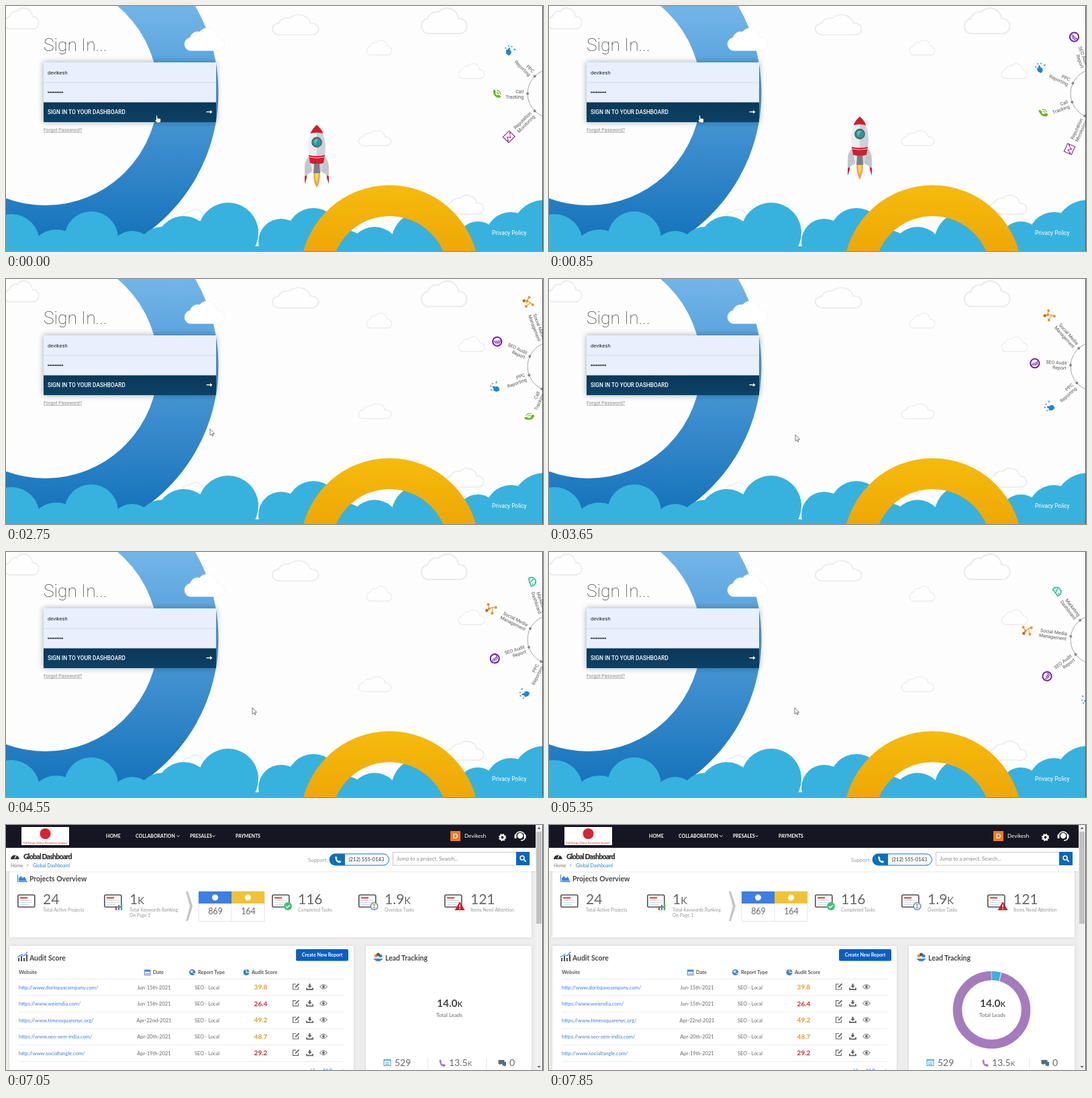
An HTML page for the animation above (8000 ms loop, 800x365 px).

```html
<!DOCTYPE html>
<html lang="en">
<head>
<meta charset="utf-8">
<title>Sign in</title>
<style>
html, body { margin: 0; width: 100%; height: 100%; overflow: hidden; background: #fdfdfe; }
svg { display: block; width: 100vw; height: 100vh; }
#login { font-family: Roboto, sans-serif; }
#board { font-family: Lato, sans-serif; }
</style>
</head>
<body>
<svg id="stage" viewBox="0 0 800 365" preserveAspectRatio="none">
  <defs>
    <linearGradient id="blue" gradientUnits="userSpaceOnUse" x1="0" y1="0" x2="0" y2="345">
      <stop stop-color="#72b5e9"/><stop offset="1" stop-color="#1673bb"/>
    </linearGradient>
    <linearGradient id="gold" gradientUnits="userSpaceOnUse" x1="0" y1="267" x2="0" y2="365">
      <stop stop-color="#f5bb0d"/><stop offset="1" stop-color="#efa704"/>
    </linearGradient>
    <linearGradient id="navy" x1="0" x2="0" y1="0" y2="1">
      <stop stop-color="#0b3857"/><stop offset="1" stop-color="#0c4166"/>
    </linearGradient>
    <filter id="soft" x="-10%" y="-25%" width="120%" height="150%">
      <feDropShadow dx="0" dy="0" stdDeviation="4.5" flood-color="#123" flood-opacity=".4"/>
    </filter>
    <filter id="lift" x="-5%" y="-10%" width="110%" height="120%">
      <feDropShadow dx="0" dy="0" stdDeviation="1.5" flood-opacity=".16"/>
    </filter>
    <path id="cloud" d="M10 33a9 9 0 0 1-2-18 12 12 0 0 1 14-8 15 15 0 0 1 26 8 9 9 0 0 1 3 18Z"/>
    <path id="phone" d="M-5-4q2-3 3 0l1 2-1 1.5q1 2 3 3l1.5-1 2 1.2q2 1.5-1 3.3Q-4 6-5-4Z"/>
    <g id="monitor">
      <rect x=".8" y=".8" width="25" height="18" rx="1.5" fill="#fff" stroke="#505050" stroke-width="1.6"/>
      <path d="M4 5h11" stroke="#d9473f" stroke-width="2.2"/>
      <path d="M4 9h18M4 12h18M4 15h13" stroke="#d5d5d5"/>
    </g>
  </defs>
  <g id="login"></g>
  <g id="board"></g>
  <path d="M799.5 0V365" stroke="#555"/>
</svg>
<script>
const $ = id => document.getElementById(id);
const text = (x, y, str, size, fill, attrs = '') =>
  `<text x="${x}" y="${y}" font-size="${size}" fill="${fill}" ${attrs}>${str}</text>`;
const rect = (x, y, w, h, fill, attrs = '') =>
  `<rect x="${x}" y="${y}" width="${w}" height="${h}" fill="${fill}" ${attrs}/>`;
const dot = (x, y, r, fill, attrs = '') =>
  `<circle cx="${x}" cy="${y}" r="${r}" fill="${fill}" ${attrs}/>`;
const path = (d, fill, attrs = '') => `<path d="${d}" fill="${fill}" ${attrs}/>`;
const line = (d, color, width = 1) => path(d, 'none', `stroke="${color}" stroke-width="${width}"`);
const use = (id, x, y, scale = 1, attrs = '') =>
  `<use href="#${id}" transform="translate(${x} ${y}) scale(${scale})" ${attrs}/>`;
const group = (id, body, attrs = '') => `<g id="${id}" ${attrs}>${body}</g>`;
const MID = 'text-anchor="middle"', BOLD = 'font-weight="700"';

/* ---------- sign-in page ---------- */
const HUB = { x: 813.6, y: 130.5, r: 36.6 };

// label lines, angle from the leading item, icon radius, icon
const wheelItems = [
  [['SEO Audit', 'Report'], 0, 90,
    dot(0, 0, 6.6, '#fff', 'stroke="#6d1bb0" stroke-width="2"') + line('M-3.5 3V.5M-1.2 3.6V-1M1.2 3.4V-2M3.5 2V-3.5', '#6d1bb0', 1.3)],
  [['PPC', 'Reporting'], -45, 91,
    path('M-3-3q2-2 3 1l4 1q3 2 1 7h-5l-4-4 2-1Z', '#1f86d2') + line('M-6-5l2 1M-1-8v2M4-6l2-2M-7 1h2', '#35a4e4', 1.8)],
  [['Call', 'Tracking'], -90, 82.5,
    use('phone', 0, 0, 1.1, 'fill="#6db21f"') + line('M0-2a3 3 0 0 1 2.500 3M0-5a6 6 0 0 1 5.500 6', '#7ebf2f', 1.3)],
  [['Reputation', 'Monitoring'], -135, 91,
    rect(-6.5, -6, 13, 12, '#fff', 'stroke="#8e2f8e" stroke-width="1.2"') + line('M-5 3l3-4 3 3 4-5', '#c0448f', 1.1) +
    [[-5, 3], [-2, -1], [1, 2], [5, -3]].map(p => dot(...p, 1.1, '#8e2f8e')).join('')],
  [['Social Media', 'Management'], 45, 102.5,
    line('M-6-4L-2 1 2-3 6-5M-2 1L-4 6M2-3L5 5', '#e99a2c', 1.1) +
    [[-6, -4], [-2, 1], [6, -5], [5, 5]].map(p => dot(...p, 2, '#e8941f')).join('') + rect(-6, 3, 4, 4, '#c8631b')],
  [['Marketing', 'Dashboard'], 89.5, 91.5,
    path('M-6 4a6.5 6.5 0 1 1 12 0Z', '#eafaf5', 'stroke="#35bd9b" stroke-width="1.7"') + line('M0 3L-3-3M3 1h2', '#35bd9b', 1.4)],
  [['Software'], 134.5, 88,
    rect(-6.5, -7.5, 13, 15, '#d93a2f', 'rx="1"') + rect(-4, -5, 8, 4, '#fff') + line('M-3 3h6M0 0v5', '#fff', 1.4)],
];

const wheelItem = ([lines, angle, r, icon]) => `<g transform="rotate(${angle})">
  ${dot(-HUB.r, 0, 2, '#888')}
  ${lines.map((s, i) => text(-42.5, -.5 + i * 7.5, s, 7, '#555', 'text-anchor="end"')).join('')}
  <g transform="translate(${-r} 0)">${icon}</g></g>`;

// x, y, width, height
const outlineClouds = [[-1, 3, 50, 31], [398, 13, 68, 30], [620, 3, 67, 38], [538, 51, 37, 22], [675, 86, 38, 22],
  [526, 186, 48, 22], [656, 282, 56, 28], [257, 303, 46, 26]];
const cloud = ([x, y, w, h], attrs) =>
  `<use href="#cloud" transform="translate(${x} ${y}) scale(${w / 58} ${h / 31}) translate(-1 -2)" ${attrs}/>`;

// x, y, radius
const bumps = [[8, 352, 42], [75, 375, 42], [127, 346, 40], [188, 368, 33], [232, 365, 36], [265, 355, 42],
  [331, 338, 45], [410, 351, 34], [458, 341, 40], [505, 372, 38], [549, 367, 38], [620, 352, 46],
  [655, 366, 36], [703, 352, 31], [752, 345, 38], [802, 338, 49]];

const rocket =
  path('M-8 44Q-18 50-18 64V88l4-14 7-4ZM8 44Q18 50 18 64V88l-4-14-7-4Z', '#c3c6cb') +
  path('M-18 77V88l3-9v-4ZM18 77V88l-3-9v-4Z', '#c8202d') +
  path('M-4.500 71Q-6 83 0 94 6 83 4.500 71Z', '#f0a04a') + path('M-2.500 71Q-3 80 0 87 3 80 2.500 71Z', '#fcd94a') +
  path('M0 0Q16 17 12 46L6 71H-6L-12 46Q-16 17 0 0Z', '#ececef') +
  path('M0 0Q16 17 12 46L6 71H0Z', '#cfd1d6') +
  path('M0 0Q7 6 9.500 13Q0 10-9.500 13-7 6 0 0Z', '#cf1f2e') +
  path('M-12 45Q0 48 12 45L10 57Q0 60-10 57Z', '#cf1f2e') +
  line('M-11.500 48Q0 51 11.500 48', '#e8e8ea', .9) + path('M-4 58H4L5 72H-5Z', '#777e8a') +
  dot(0, 26, 7, '#2a9b9b', 'stroke="#58606c" stroke-width="1.8"') + path('M-4 24a5 5 0 0 1 6-2l-5 7Z', '#63c6c0');

$('login').innerHTML =
  rect(0, 0, 800, 365, '#fdfdfe') +
  outlineClouds.map(c => cloud(c, 'fill="#fefefe" stroke="#ebebee" stroke-width="1.8"')).join('') +
  dot(58.5, 129, 213, 'none', 'stroke="url(#blue)" stroke-width="90"') +
  cloud([267, 33, 59, 33.5], 'fill="#fff" stroke="#eceff3" stroke-width=".6"') +
  bumps.map(b => dot(...b, '#37b2de')).join('') + rect(0, 358, 800, 7, '#37b2de') +
  dot(571.5, 400, 110, 'none', 'stroke="url(#gold)" stroke-width="46"') +
  group('rocket', rocket) +
  text(56, 67, 'Sign In...', 26.4, '#333', 'font-weight="100"') +
  rect(56, 84, 257, 89, '#e8f0fe', 'filter="url(#soft)"') +
  line('M56 114H313', '#c9d1dd', .8) + rect(56, 143.5, 257, 29.5, 'url(#navy)') +
  text(62, 101.5, 'devikesh', 7.6, '#222') +
  Array.from({ length: 9 }, (_, i) => dot(63.2 + i * 2.6, 128.6, 1.05, '#111')).join('') +
  text(62, 160.6, 'SIGN IN TO YOUR DASHBOARD', 8.3, '#fff', 'font-weight="500"') +
  line('M298.5 157.7H306', '#fff', 1.4) + path('M304 155l3.5 2.7-3.5 2.7Z', '#fff') +
  text(56, 186.8, 'Forgot Password?', 7.1, '#8a8a8a', 'text-decoration="underline"') +
  text(724, 341.3, 'Privacy Policy', 8.4, '#fff') +
  dot(HUB.x, HUB.y, HUB.r, '#fff', 'stroke="#999" stroke-width=".9"') +
  group('wheel', wheelItems.map(wheelItem).join('')) +
  group('hand', path('M2 0q1.2-.6 1.6.5V4l4 .9q1.3.4 1 2L8 11H3L-.4 7q.3-1.5 2 0V1Z', '#fff', 'stroke="#333" stroke-width=".7"')) +
  group('arrow', path('M0 0V9.5L2.3 7.5 3.8 10.6 5 10 3.6 7H6.6Z', '#fff', 'stroke="#444" stroke-width=".7"'));

/* ---------- dashboard page ---------- */
const GREY = '#666', PALE = '#999', LINK = '#3c7edb';
const kilo = n => `${n}<tspan font-size="70%">K</tspan>`;
const panel = (x, y, w, h) => rect(x, y, w, h, '#fff', 'filter="url(#lift)"');
const heading = (x, y, str) => text(x, y, str, 10.4, '#444', BOLD);
const metric = (x, icon, value, ...labels) => use('monitor', icon, 103.5) +
  text(x, 117.5, value, 21, GREY) + labels.map((s, i) => text(x, 128.5 + i * 8, s, 6.9, PALE)).join('');

const nav =
  rect(23, 3, 71, 27, '#fff') + dot(58.5, 13, 8, '#d5232f') +
  text(58.5, 27.5, 'Full Range Online Promotion Support', 4, '#c33', MID) +
  [[149, 'HOME'], [193, 'COLLABORATION'], [274, 'PRESALES'], [342, 'PAYMENTS']]
    .map(([x, s]) => text(x, 19, s, 7, '#fff', BOLD)).join('') +
  line('M254.5 15.5l2 2 2-2M307.5 15.5l2 2 2-2', '#fff') +
  rect(662, 9, 15, 15, '#ee7a1b') + text(669.5, 20, 'D', 10, '#fff', MID + BOLD) +
  text(683, 19, 'Devikesh', 8, '#fff') +
  dot(739.5, 18.5, 3.2, 'none', 'stroke="#fff" stroke-width="2.6"') +
  dot(739.5, 18.5, 4.8, 'none', 'stroke="#fff" stroke-width="1.7" stroke-dasharray="2 1.77"') +
  dot(766, 16, 4.2, '#fff') + line('M759 17a7 7 0 0 1 14 0M773 18q0 5-6 5', '#fff', 1.5) +
  rect(757.5, 14, 3, 6, '#fff', 'rx="1"') + rect(771.5, 14, 3, 6, '#fff', 'rx="1"');

const header =
  path('M7 51a6.3 6.3 0 1 1 12.6 0Z', '#333') + line('M13 50l2.4-5', '#fff', 1.2) +
  text(26, 51, 'Global Dashboard', 10.5, '#333', 'font-weight="900" letter-spacing="-.8"') +
  text(7, 63, 'Home', 7, '#777') + line('M31 58l2.2 2.2L31 62.4', '#888', .8) +
  text(40, 63, 'Global Dashboard', 7, '#1b84cf') +
  text(450, 54.5, 'Support:', 7.8, PALE) +
  rect(482, 43, 88.5, 17, '#fff', 'rx="8.5" stroke="#0a70c0"') +
  path('M505 43H490.5a8.5 8.5 0 0 0 0 17H505Z', '#0a70c0') + use('phone', 494.5, 51.5, .85, 'fill="#fff"') +
  text(537, 54.3, '(212) 555-0143', 7.6, '#333', MID) +
  rect(576.5, 40.5, 184, 19.5, '#fff', 'stroke="#bbb" stroke-width=".8"') +
  text(582, 53, 'Jump to a project, Search...', 7.8, '#888') +
  rect(760, 40, 20, 20, '#0a66bd') +
  dot(769, 49, 3, 'none', 'stroke="#fff" stroke-width="1.5"') + line('M771.2 51.2l3.5 3.5', '#fff', 1.8);

const overview =
  line('M17.5 74V84.5H32', '#3a78c9') + path('M19 83.5V79l3-3 3 3 3-2 3 6.5Z', '#3f83dd') +
  heading(35, 84, 'Projects Overview') +
  metric(55, 17, '24', 'Total Active Projects') +
  metric(184, 146, kilo('1'), 'Total Keywords Ranking', 'On Page 1') +
  line('M164 127v-6', '#d9473f', 2.4) + line('M168 127v-8', '#3f83dd', 2.4) + line('M172 127v-11', '#43b05c', 2.4) +
  path('M268 99h3l7 22-7 22h-3l6-22Z', '#c4c4c4') +
  rect(287, 99, 98, 44.5, '#fff', 'stroke="#ddd" stroke-width=".8"') +
  rect(287, 99, 49, 18, '#3d7fe3') + rect(336, 99, 49, 18, '#f0c335') + line('M336 117v26', '#ddd', .8) +
  dot(311.5, 108, 4.5, '#fff') + dot(360.5, 108, 4.5, '#fff') +
  text(312, 133, '869', 12.5, GREY, MID) + text(361, 133, '164', 12.5, GREY, MID) +
  metric(435, 396, '116', 'Completed Tasks') + dot(420, 121, 6, '#3dc07c') + line('M417 121l2 2.2 4-4', '#fff', 1.4) +
  metric(564, 525, kilo('1.9'), 'Overdue Tasks') +
  dot(548.5, 121, 5.3, '#eef6fc', 'stroke="#4a93d2" stroke-width="1.5"') + path('M546 118h5l-2.5 3 2.5 3h-5l2.5-3Z', '#e99a3a') +
  metric(692, 653, '121', 'Items Need Attention') + path('M676 114l7.5 13h-15Z', '#c9202b') + line('M676 118.5v4M676 124v1.5', '#fff', 1.4);

const auditShell =
  line('M19 203v-5M23 203v-8M27 203v-5M31 203v-10', '#555', 2.2) + line('M17 197l6-4 4 2 5-6', '#3f83dd', 1.2) +
  heading(35, 201.5, 'Audit Score') +
  rect(432, 185, 78, 17.5, '#0b5fc0', 'rx="2"') + text(471, 196.3, 'Create New Report', 7.1, '#fff', MID + BOLD) +
  [[19, 'Website'], [219, 'Date'], [286, 'Report Type'], [366, 'Audit Score']]
    .map(([x, s]) => text(x, 222.3, s, 7.4, '#555', BOLD)).join('') +
  rect(206.5, 216, 8.5, 7.5, '#fff', 'stroke="#3f83dd"') + rect(206.5, 216, 8.5, 2.6, '#3f83dd') + line('M208 221.3h6', '#3f83dd') +
  dot(277.5, 219.5, 4.6, '#3f83dd') + path('M274 218l3-2 2 2-2 3ZM278 222l3-2v2Z', '#cfe2fa') +
  dot(358, 219.5, 4.6, '#3f83dd') + line('M358 214.5v5h5', '#fff');

const rowIcons = y => `<g transform="translate(0 ${y})">` +
  line('M432-4h-4.500v8h8V0', GREY, 1.1) + line('M431 1l5.500-5.500', GREY, 1.8) +
  line('M448 1.500v2.500h9V1.500', GREY, 1.8) + path('M451.300-4.500h2.400v3h2l-3.200 3.500-3.200-3.500h2Z', GREY) +
  path('M467.500 0q5.500-6.500 11 0-5.500 6.500-11 0Z', 'none', `stroke="${GREY}"`) + dot(473, 0, 1.9, GREY) + '</g>';

const rows = [
  ['http://www.dorinpaxcompany.com/', 'Jun-15th-2021', '39.8'],
  ['https://www.weiendia.com/', 'Jun-15th-2021', '26.4'],
  ['https://www.timessquarenyc.org/', 'Apr-22nd-2021', '49.2'],
  ['https://www.seo-sem-india.com/', 'Apr-20th-2021', '48.7'],
  ['http://www.socialtangle.com/', 'Apr-19th-2021', '29.2'],
].map(([url, date, score], i) => {
  const y = 244.5 + i * 24.6;
  return line(`M19 ${y - 15}H504`, '#e4e4e4', .8) + text(19, y, url, 7.6, LINK) +
    text(220.5, y, date, 7.5, GREY, MID) + text(299.5, y, 'SEO - Local', 7.3, GREY, MID) +
    text(379.5, y + .5, score, 10, score < 30 ? '#cf2a2a' : '#e59a2b', MID + BOLD) + rowIcons(y - 3.5);
}).join('') + line('M19 352.5H504', '#e4e4e4', .8) + text(454, 368.5, 'View All Report ▸', 7.2, LINK);

const leadShell =
  dot(551, 195, 2.5, '#e99a3a') + dot(558, 195, 2.5, '#3f83dd') + dot(554.5, 193, 2.5, '#555') +
  path('M547 199h15l-5 4h-5Z', '#3f83dd') + heading(565, 201.5, 'Lead Tracking') +
  text(661, 270.5, kilo('14.0'), 15.5, '#444', MID + BOLD) + text(660.5, 286, 'Total Leads', 8, GREY, MID) +
  line('M628.500 346v18M715.500 346v18', '#ddd', .8) +
  rect(563, 349.5, 10, 9, '#fff', 'stroke="#3aa0d0"') + line('M563 351h10M565 354h6M565 356.500h6', '#3aa0d0', 1.2) +
  text(579, 359, '529', 14, GREY) +
  use('phone', 650, 354.5, .9, 'fill="#a57bbd"') + text(660, 359, kilo('13.5'), 14, GREY) +
  path('M733.500 350h9v6h-5l-2 2v-2h-2Z', '#566d7c') + path('M741 353h4v5.500h-1v1.500l-2-1.500h-3Z', '#566d7c') + text(750, 359, '0', 14, GREY);

const arc = (id, color) => `<circle id="${id}" cx="659.500" cy="275.500" r="51" fill="none" stroke="${color}"
  stroke-width="13.500" pathLength="100" transform="rotate(-90 659.500 275.500)"/>`;

$('board').innerHTML =
  rect(0, 0, 800, 365, '#ededee') +
  group('content',
    panel(5, 60, 778, 107.5) + panel(5, 180, 513, 200) + panel(536, 180, 247, 200) +
    overview + auditShell + leadShell + group('rows', rows) +
    arc('leadBlue', '#3bb0dd') + arc('leadPurple', '#a57bbd')) +
  rect(0, 34, 789, 35, '#fff', 'filter="url(#lift)"') + rect(0, 0, 789, 34, '#161622') +
  group('chrome', nav + header +
    rect(789, 0, 10, 365, '#f1f1f1') + rect(790, 10, 8, 137, '#c1c1c1') +
    path('M794 3l2.500 3h-5ZM794 362l2.500-3h-5Z', '#666'));

/* ---------- timeline ---------- */
const LOOP = 8000, STEP = 50, PAGE = 6400, CONTENT = 6750, ROWS = 7050, DONUT = [7300, 7650];
const pointer = [[0, 222, 163], [2100, 222, 163], [2750, 304, 223.5], [3400, 367, 232], [4600, 367, 232], [4800, 366, 232]];
const clamp = v => Math.min(1, Math.max(0, v));
const show = (id, on) => $(id).setAttribute('display', on ? 'inline' : 'none');
const place = (id, value) => $(id).setAttribute('transform', value);

function pointerAt(t) {
  const i = pointer.findIndex(k => k[0] > t);
  if (i < 0) return pointer.at(-1).slice(1);
  const [a, b] = [pointer[i - 1], pointer[i]];
  const p = (t - a[0]) / (b[0] - a[0]), eased = p * p * (3 - 2 * p);
  return [1, 2].map(n => a[n] + (b[n] - a[n]) * eased);
}

function render(t) {
  show('login', t < PAGE);
  show('board', t >= PAGE);
  if (t < PAGE) {
    place('wheel', `translate(${HUB.x} ${HUB.y}) rotate(${90 - .0238 * t})`);
    place('rocket', `translate(463 ${177 - 72 * (t / 1600) ** 2.8})`);
    const [x, y] = pointerAt(t), overButton = y < 173;
    place('hand', `translate(${x} ${y})`);
    place('arrow', `translate(${x} ${y})`);
    show('hand', overButton);
    show('arrow', !overButton);
    return;
  }
  show('content', t >= CONTENT);
  show('chrome', t >= CONTENT);
  show('rows', t >= ROWS);
  const p = clamp((t - DONUT[0]) / (DONUT[1] - DONUT[0]));
  $('leadBlue').setAttribute('stroke-dasharray', `${3.9 * p} 100`);
  $('leadPurple').setAttribute('stroke-dasharray', `0 ${4.2 * p} ${95.6 * p} 100`);
  show('leadBlue', p > 0);
  show('leadPurple', p > 0);
}

const start = performance.now();
(function tick() {
  const t = (performance.now() - start) % LOOP;
  render(Math.floor(t / STEP) * STEP);
  requestAnimationFrame(tick);
})();
</script>
</body>
</html>
```
